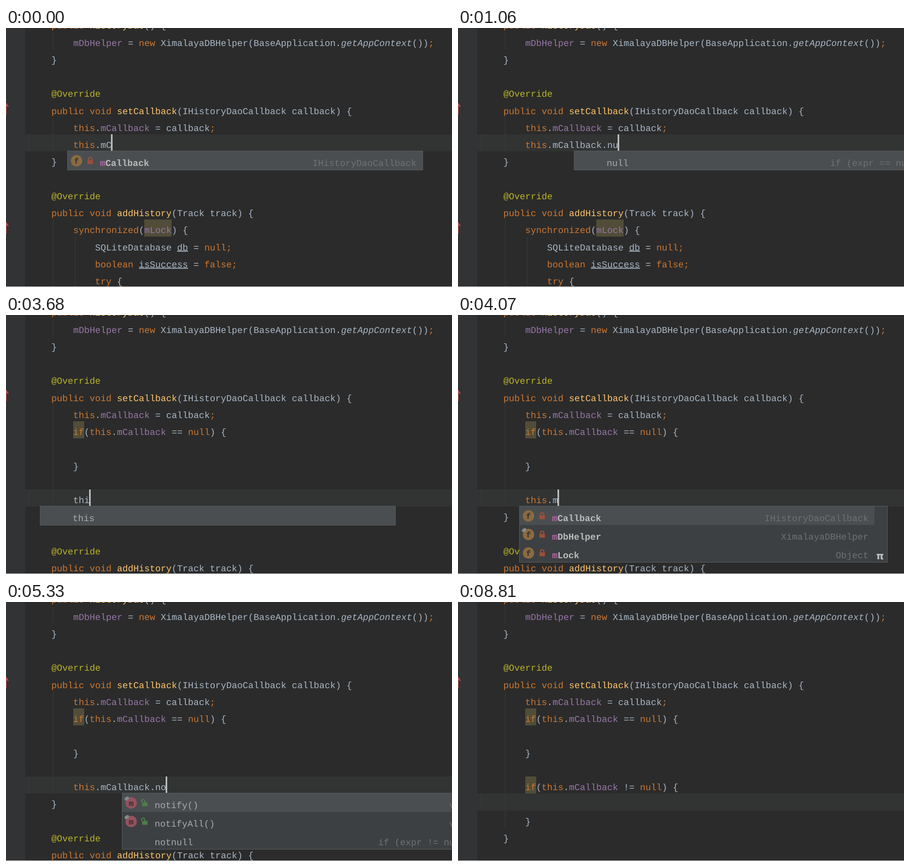
Animation, 816 px wide and 475 px high, one loop 8910 ms. Source, as an HTML page:

```html
<!DOCTYPE html>
<html lang="en">
<head>
<meta charset="utf-8">
<title>Postfix completion</title>
<style>
  html, body { margin: 0; width: 100%; height: 100%; overflow: hidden; background: #2b2b2b; }
  svg { display: block; }
  text { font: 16.664px "Liberation Mono", "DejaVu Sans Mono", monospace; fill: #a9b7c6; white-space: pre; text-rendering: geometricPrecision; }
  .keyword { fill: #cc7832; }
  .field { fill: #9876aa; }
  .method { fill: #ffc66d; }
  .annotation { fill: #bbb529; }
  .static { font-style: italic; }
  .reassigned { text-decoration: underline; }
  .label { fill: #a9abad; }
  .own { font-weight: bold; fill: #bbbbbb; }
  .match { fill: #b066a5; }
  .hint { fill: #6f7274; text-anchor: end; }
  .icon { font-size: 15px; font-weight: bold; fill: #35322f; text-anchor: middle; }
  .pi { font: bold 18px "DejaVu Sans", sans-serif; fill: #c4c4c4; text-anchor: middle; }
</style>
</head>
<body>
<svg id="stage" width="816" height="475" viewBox="0 0 816 475"></svg>
<script>
const LOOP = 8910, CELL = 10, LEFT = 83, PITCH = 31.25, FIRST_ROW = -7;
const rowTop = row => 195 + PITCH * row;
const colX = col => LEFT + CELL * col;
const rect = (x, y, w, h, fill) => `<rect x="${x}" y="${y}" width="${w}" height="${h}" fill="${fill}"/>`;

const HEAD = [
  'public HistoryDao() {',
  '    mDbHelper = new XimalayaDBHelper(BaseApplication.getAppContext());',
  '}', '',
  '@Override',
  'public void setCallback(IHistoryDaoCallback callback) {',
  '    this.mCallback = callback;'
];
const TAIL = [
  '}', '',
  '@Override',
  'public void addHistory(Track track) {',
  '    synchronized(mLock) {',
  '        SQLiteDatabase db = null;',
  '        boolean isSuccess = false;',
  '        try {'
];
const NULL_CHECK = ['    if(this.mCallback == null) {', '', '    }'];
const BEFORE = [...NULL_CHECK, ''];
const NOT_NULL = 'if(this.mCallback != null) {';

const RULES = [
  [/^(public|void|this|new|synchronized|boolean|null|false|try|if|;)$/, 'keyword'],
  [/^m(Callback|DbHelper|Lock)$/, 'field'],
  [/^(setCallback|addHistory|HistoryDao)$/, 'method'],
  [/^@/, 'annotation'],
  [/^getAppContext$/, 'static'],
  [/^(db|isSuccess)$/, 'reassigned']
];

// Completion items: icon kind, label, hint, matched length, pinned badge
const field = (label, hint, match, pin) => ({ kind: 'f', label, hint, match, pin });
const method = (label, hint) => ({ kind: 'm', label, hint, match: 0, pin: true });
const plain = (label, hint = '') => ({ label, hint, match: 0 });

const callbackField = match => field('mCallback', 'IHistoryDaoCallback', match);
const fields = match => [
  callbackField(match),
  field('mDbHelper', 'XimalayaDBHelper', match, true),
  field('mLock', 'Object', match)
];
const notifies = [method('notify()', 'void'), method('notifyAll()', 'void')];
const isNull = plain('null', 'if (expr == null)');
const notNull = plain('notnull', 'if (expr != null)');
const members = [
  method('equals(Object obj)', 'boolean'), method('hashCode()', 'int'),
  method('toString()', 'String'), ...notifies,
  method('getClass()', 'Class'), method('wait()', 'void'), notNull
];
const keywords = [plain('this'), plain('throw')];

// '~' marks a line the editor has not resolved yet
const typed = (at, before, text, items) => ({
  at, items,
  body: [...before, '~    ' + text],
  caret: [before.length, 4 + text.length],
  popupCol: 4 + text.lastIndexOf('.') + 1
});
const still = (at, body, caret, braces = []) => ({ at, body, caret, braces });

const CALL = 'this.mCallback';
const SECOND = [...BEFORE, '    ' + NOT_NULL, '', '    }'];
const STATES = [
  typed(0, [], 'this.mC', [callbackField(1)]),
  typed(120, [], 'this.mC', [callbackField(2)]),
  typed(370, [], CALL),
  typed(640, [], CALL + '.'),
  typed(780, [], CALL + '.', members),
  typed(920, [], CALL + '.n', [...notifies, notNull, isNull]),
  typed(1060, [], CALL + '.nu', [isNull]),
  typed(1190, [], CALL + '.nul', [isNull]),
  still(1620, ['~' + NULL_CHECK[0], '', '    }'], [1, 8]),
  still(1870, NULL_CHECK, [1, 8]),
  still(2150, NULL_CHECK, [2, 5], [[0, 31], [2, 4]]),
  still(2580, BEFORE, [3, 4]),
  still(3130, [...BEFORE, ''], [4, 4]),
  typed(3410, BEFORE, 't', keywords),
  typed(3540, BEFORE, 'th', keywords),
  typed(3670, BEFORE, 'thi', [keywords[0]]),
  typed(3800, BEFORE, 'this', [keywords[0]]),
  typed(3930, BEFORE, 'this.', [...fields(0), ...members]),
  typed(4070, BEFORE, 'this.m', fields(1)),
  typed(4480, BEFORE, 'this.mC', [callbackField(2)]),
  typed(4750, BEFORE, CALL),
  typed(5060, BEFORE, CALL + '.', members),
  typed(5195, BEFORE, CALL + '.n', [...notifies, notNull, isNull]),
  typed(5330, BEFORE, CALL + '.no', [...notifies, notNull]),
  typed(5480, BEFORE, CALL + '.not', [...notifies, notNull]),
  typed(5615, BEFORE, CALL + '.notn', [notNull]),
  typed(5750, BEFORE, CALL + '.notnu', [notNull]),
  still(6560, [...BEFORE, '~    ' + NOT_NULL, '', '    }'], [5, 8]),
  still(6830, SECOND, [5, 8]),
  still(7990, SECOND, [5, 8]),
  still(8530, SECOND, [5, 8]),
  still(8810, SECOND, [5, 8])
];
const CARET_OFF = [7990, 8810];

function codeLine(source, row) {
  const raw = source[0] === '~';
  const line = raw ? source.slice(1) : source;
  let marks = '', spans = '';
  for (const { 0: word, index } of line.matchAll(/@?\w+|;|[^\s\w;@]+/g)) {
    let style = (RULES.find(([test]) => test.test(word)) || [])[1] || '';
    if (raw && style === 'field') style = '';
    if (!raw && /^(if|mLock)$/.test(word))
      marks += rect(colX(index), rowTop(row), word.length * CELL, PITCH, '#514d38');
    spans += `<tspan x="${colX(index)}" class="${style}">${word}</tspan>`;
  }
  return `${marks}<text y="${rowTop(row) + 25}">${spans}</text>`;
}

function overrideArrow(row) {
  const y = rowTop(row) + 5;
  return `<path d="M0 ${y + 21}V${y + 1}L4 ${y + 7}" fill="none" stroke="#c75450" stroke-width="2"/>`;
}

function itemIcons({ kind, pin }, x, y) {
  if (!kind) return '';
  const isField = kind === 'f', lock = isField ? '#9a4f38' : '#4f7d4a';
  const shackle = isField ? `M${x + 39} ${y}v-3a3 3 0 0 1 6 0v3` : `M${x + 36} ${y - 1}v-2a3 3 0 0 1 6 0v3`;
  return `<circle cx="${x + 17}" cy="${y}" r="10.5" fill="${isField ? '#8b6b40' : '#95525f'}"/>
    <text class="icon" x="${x + 17}" y="${y + 5}">${kind}</text>
    ${rect(x + 37, y - 1, 10, 7, lock)}
    <path d="${shackle}" fill="none" stroke="${lock}" stroke-width="2"/>` +
    (pin ? `<ellipse cx="${x + 9}" cy="${y - 8}" rx="4.5" ry="3" fill="#85898b" transform="rotate(-35 ${x + 9} ${y - 8})"/>` : '');
}

function popup({ items, caret, popupCol }) {
  if (!items) return '';
  const x = colX(popupCol) - 61, y = Math.round(rowTop(caret[0]) + 30);
  const wide = items.length > 2, width = wide ? 673 : 650, height = items.length * 34 + 2;
  let out = rect(x, y, width + 1, height, '#56595b') +
    rect(x + 1, y + 1, width - 1, height - 2, '#3d4042') +
    rect(x + 1, y + 1, 649, 34, '#4a4e50');
  items.forEach((item, i) => {
    const base = y + 27.5 + 34 * i, { label, match } = item;
    out += itemIcons(item, x, y + 18.5 + 34 * i) +
      `<text class="${item.kind === 'f' ? 'own' : 'label'}" x="${x + 60}" y="${base}">` +
      `<tspan class="match">${label.slice(0, match)}</tspan>${label.slice(match)}</text>` +
      `<text class="hint" x="${x + 639}" y="${base}">${item.hint}</text>`;
  });
  if (wide) out += `<text class="pi" x="${x + 660}" y="${y + height - 6}">π</text>`;
  return out;
}

function draw(state) {
  const { body, caret: [row, col], braces = [] } = state;
  const end = body.length;
  const guide = (c, from, to) => rect(colX(c) + 3, rowTop(from), 1, rowTop(to) - rowTop(from), '#363838');
  return rect(0, 0, 816, 475, '#2b2b2b') +
    rect(0, 0, 35, 475, '#313335') +
    rect(35, rowTop(row), 781, PITCH, '#323333') +
    rect(42, rowTop(row), 1, PITCH, '#3a3b3b') +
    guide(0, -6, -5) + guide(0, -1, end) + guide(0, end + 4, end + 10) + guide(4, end + 5, end + 10) +
    braces.map(([r, c]) => rect(colX(c), rowTop(r), CELL, PITCH, '#3b514d')).join('') +
    [...HEAD, ...body, ...TAIL].map((line, i) => codeLine(line, i + FIRST_ROW)).join('') +
    overrideArrow(-2) + overrideArrow(end + 4) +
    (CARET_OFF.includes(state.at) ? '' : rect(colX(col) - 1, rowTop(row), 3, PITCH, '#bbbbbb')) +
    rect(0, 474, 816, 1, '#d0d0d0') +
    popup(state);
}

const stage = document.getElementById('stage');
const start = performance.now();
let shown;
function tick() {
  const time = (performance.now() - start) % LOOP;
  const state = STATES.findLast(s => s.at <= time);
  if (state !== shown) stage.innerHTML = draw(shown = state);
  requestAnimationFrame(tick);
}
tick();
</script>
</body>
</html>
```
